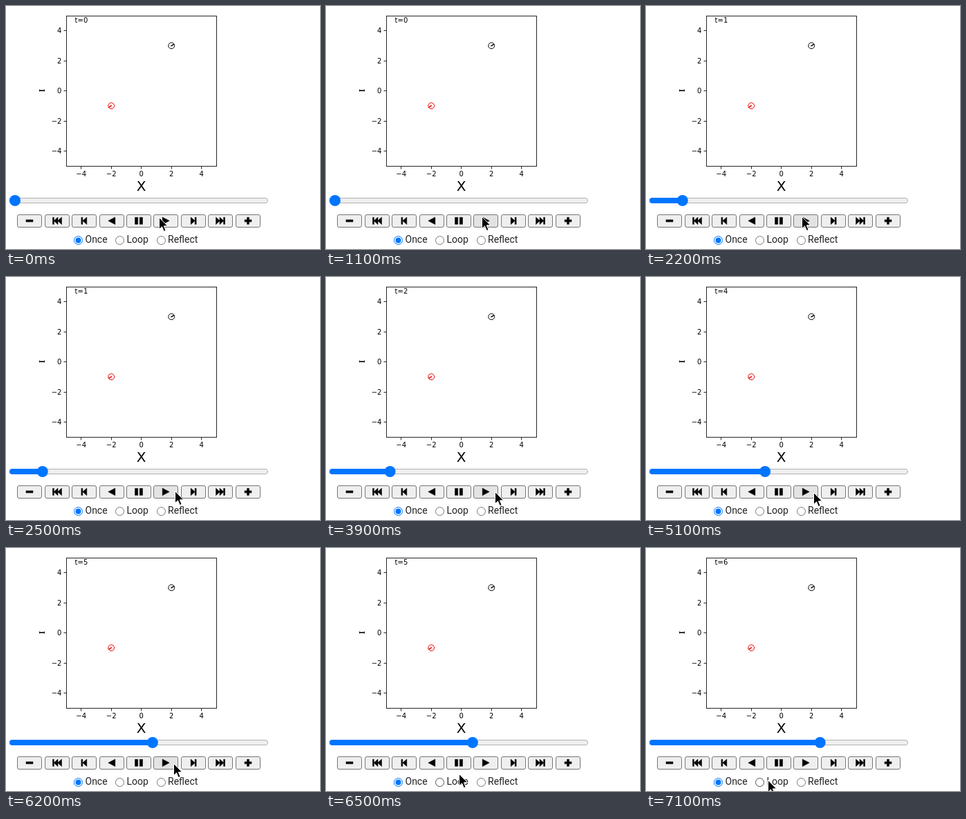
These frames come from a looping animation (454 by 351 pixels, 8000 ms). An HTML page:

```html
<!DOCTYPE html>
<html lang="en">
<head>
<meta charset="utf-8">
<title>Plot player</title>
<style>
  html, body { margin: 0; width: 100%; height: 100%; overflow: hidden; background: #fff; }
  svg { display: block; }
  .plot text { font: 10px "DejaVu Sans", sans-serif; }
  .plot text.axis { font-size: 20px; }
  .plot path, .plot rect, .plot circle { fill: none; stroke: #000; }
  .plot .red { stroke: #f00000; }
  .button { fill: #efefef; stroke: #767676; }
  .labels { font: 14px Roboto, sans-serif; fill: #212121; }
  .radio { fill: #fff; stroke: #767676; }
</style>
</head>
<body>
<svg width="454" height="351" viewBox="0 0 454 351">
  <g class="plot">
    <rect x="87.5" y="14.5" width="217" height="217" stroke-opacity=".85"/>
    <g id="ticks"></g>
    <text id="time" x="99.6" y="24"></text>
    <text class="axis" x="195.7" y="267.3" text-anchor="middle">X</text>
    <path d="M48 122.2H56" stroke-width="1.6"/>
    <path d="M48.5 120.5V123.5M55.5 120.5V123.5" stroke-opacity=".8"/>
    <circle cx="239.2" cy="57.3" r="4.4"/>
    <path d="M238.4 57.8L243 55.1" stroke-width="1.5"/>
    <circle class="red" cx="152.2" cy="144.2" r="4.4"/>
    <path class="red" d="M153 143.7L148.4 146.4" stroke-width="1.5"/>
  </g>

  <rect x="5.5" y="277.5" width="373" height="7" rx="3.5" fill="#efefef" stroke="#b2b2b2"/>
  <rect id="fill" x="5" y="277" height="8" rx="4" fill="#0075ff"/>
  <circle id="thumb" cy="281" r="8" fill="#0075ff"/>

  <g id="buttons"></g>

  <g class="labels">
    <circle class="radio" cx="104.5" cy="338.5" r="6" style="stroke:#0075ff"/>
    <circle cx="104.5" cy="338.5" r="4" fill="#0075ff"/>
    <circle class="radio" id="loopRadio" cx="164.5" cy="338.5" r="6"/>
    <circle class="radio" cx="224.5" cy="338.5" r="6"/>
    <text x="114.5" y="342">Once</text>
    <text x="174.5" y="342">Loop</text>
    <text x="234" y="342">Reflect</text>
  </g>

  <path id="cursor" d="M0 0V17L4 13.3L6.9 20L9.6 18.9L6.8 12.3H12.2Z"
        fill="#000" stroke="#fff" stroke-linejoin="round"/>
</svg>
<script>
const $ = id => document.getElementById(id);
const LOOP = 8000;

// Axis ticks and their labels
$('ticks').innerHTML = [-4, -2, 0, 2, 4].map(v => {
  const x = 195.7 + v * 21.74, y = 122.6 - v * 21.74;
  const label = String(v).replace('-', '\u2212');
  return `<path d="M${Math.floor(x) + .5} 232v3.5M87 ${Math.floor(y) + .5}h-3.5" stroke-opacity=".85"/>
    <text x="${x}" y="246.3" text-anchor="middle">${label}</text>
    <text x="80.4" y="${y + 3.8}" text-anchor="end">${label}</text>`;
}).join('');

// Player icons, drawn around their own centre
const bar = (x, w) => `M${x} -5h${w}v10h${-w}z`;
const triangle = (x, w) => `M${x} -5.3l${w} 5.3l${-w} 5.3z`;
const minus = 'M-5 -1.5h10v3h-10z';
const step = bar(2.2, 1.9) + triangle(-3.8, 6);
const fast = bar(4.6, 1.9) + triangle(-6.5, 5.8) + triangle(-1, 5.8);
const play = triangle(-4.8, 10);
const icons = [
  [minus], [fast, -1], [step, -1], [play, -1],
  [bar(-5.5, 4.2) + bar(1.3, 4.2)],
  [play], [step], [fast], [minus + 'M-1.5 -5h3v10h-3z']
];
$('buttons').innerHTML = icons.map(([d, flip = 1], i) => {
  const x = Math.round(16.2 + i * 39.45);
  return `<rect class="button" x="${x + .5}" y="301.5" width="35" height="18" rx="2.5"/>
    <path d="${d}" transform="translate(${x + 18} 310.3) scale(${flip} 1)"
      stroke="#000" stroke-width=".5" stroke-linejoin="round"/>`;
}).join('');
const playButton = document.querySelectorAll('.button')[5];

const counterTimes = [0, 2200, 3100, 4100, 5100, 6200, 7100];
// Pointer positions: [start ms, x, y]
const pointer = [
  [0, 221, 305], [100, 225, 304],
  [2300, 233, 306], [2400, 240, 308], [2500, 244, 309],
  [3900, 244, 310], [4000, 243, 311], [4200, 242, 311],
  [6300, 232, 315], [6400, 212, 320], [6500, 192, 326],
  [6600, 181, 332], [6700, 176, 335]
];

function draw(ms) {
  const count = counterTimes.filter(t => t <= ms).length - 1;
  const thumbX = 13 + count * 39.78;
  $('time').textContent = 't=' + count;
  $('thumb').setAttribute('cx', thumbX);
  $('fill').setAttribute('width', thumbX - 5);

  const [, x, y] = pointer.filter(p => p[0] <= ms).pop();
  $('cursor').setAttribute('transform', `translate(${x + .5} ${y + .5})`);

  const hovered = ms >= 100 && x >= 213 && x < 249 && y < 320;
  const pressed = ms >= 1000 && ms < 1100;
  playButton.style.fill = pressed ? '#f5f5f5' : hovered ? '#e3e3e3' : '';
  $('loopRadio').style.stroke = y >= 326 ? '#4f4f4f' : '';
}

const start = performance.now();
function tick() {
  draw((performance.now() - start) % LOOP);
  requestAnimationFrame(tick);
}
tick();
</script>
</body>
</html>
```
